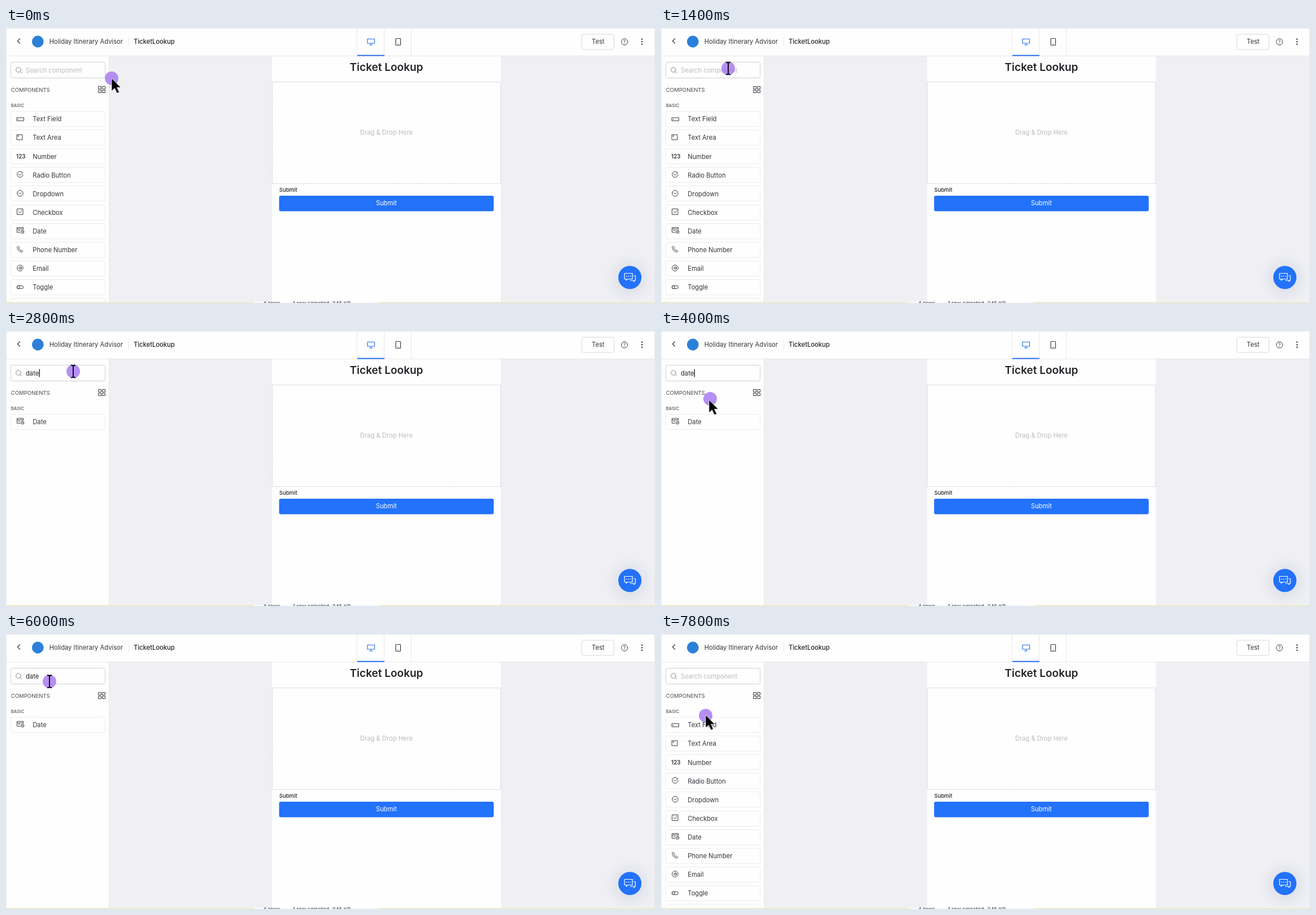
These frames come from a looping animation (1149x487 px, 8 s). An HTML page:

```html
<!DOCTYPE html>
<html lang="en">
<head>
<meta charset="utf-8">
<title>Form builder</title>
<style>
  html, body { margin: 0; width: 100%; height: 100%; overflow: hidden; background: #f0f0f4; }
  svg { display: block; }
  text { font: 400 11.2px Inter, sans-serif; fill: #33353b; white-space: pre; }
  .mid { text-anchor: middle; }
  .medium { font-weight: 500; fill: #24262b; }
  .hint { fill: #bcbcc0; }
  .panel { fill: #fefefe; }
  .rule { stroke: #e8e8ea; fill: none; }
  .icon { fill: none; stroke: #3a3b40; stroke-width: 1; stroke-linecap: round; stroke-linejoin: round; }
  .row rect { fill: #fefefe; stroke: #ececee; }
  .row.hover rect { fill: #f1f1f4; }
  .ink { fill: #000; stroke: #fff; stroke-width: .7; }
</style>
</head>
<body>
<svg width="1149" height="487" viewBox="0 0 1149 487">
  <defs>
    <radialGradient id="glow">
      <stop offset=".4" stop-color="#bfc6da" stop-opacity=".32"/>
      <stop offset="1" stop-color="#d5d9e6" stop-opacity="0"/>
    </radialGradient>
  </defs>
  <rect width="1149" height="487" fill="#f0f0f4"/>

  <!-- form canvas -->
  <rect class="panel" x="471" y="49" width="405" height="437"/>
  <text class="mid" x="673.5" y="76.3" style="font-size:19px;font-weight:600;fill:#222428">Ticket Lookup</text>
  <rect x="471.5" y="95.5" width="404" height="180" fill="none" stroke="#d0d0d2" stroke-dasharray="2 1"/>
  <text class="mid hint" x="673.5" y="188.6">Drag &amp; Drop Here</text>
  <text x="483.7" y="290.4" class="medium" style="font-size:9.6px">Submit</text>
  <rect x="483.5" y="297" width="380" height="27.5" rx="3" fill="#2272fb"/>
  <text class="mid" x="673.5" y="314.3" style="fill:#fff">Submit</text>

  <!-- sidebar -->
  <rect class="panel" y="49" width="182" height="437"/>
  <path class="rule" d="M182.5 49V486"/>
  <rect x="8.5" y="60.5" width="167" height="28" rx="3" fill="#fefefe" stroke="#d0d0d3"/>
  <g class="icon" style="stroke:#8a8b90"><circle cx="22" cy="74" r="4.3"/><path d="M25.2 77.2l2.6 2.6"/></g>
  <text x="8.7" y="113.4" style="font-size:9.6px;fill:#4a4b50">COMPONENTS</text>
  <path class="icon" d="M164 103.500h4.500v4.500h-4.500zM171 103.500h4.500v4.500h-4.500zM164 110h4.500v4.500h-4.500zM171 110h4.500v4.500h-4.500z"/>
  <text x="8.7" y="140.300" style="font-size:7.800px;font-weight:500;fill:#55565b">BASIC</text>
  <g id="list"></g>
  <rect id="mark" x="35" y="67" height="15" fill="#2f86ee"/>
  <text id="query" x="35" y="78.7"></text>
  <rect id="caret" y="67.500" width="1.200" height="14" fill="#000"/>

  <!-- header -->
  <rect class="panel" width="1149" height="49"/>
  <path class="rule" d="M0 49.5H1149M621.500 0V49M669.500 0V49M717.500 0V49M217.500 16V32"/>
  <path class="icon" style="stroke-width:1.300" d="M24.500 19l-4 4 4 4"/>
  <circle cx="56.300" cy="24" r="10.400" fill="#2c80d8"/>
  <text x="76.700" y="27.700">Holiday Itinerary Advisor</text>
  <text class="medium" x="226" y="27.700">TicketLookup</text>
  <rect x="622" y="47.700" width="48" height="2" fill="#2a70ea"/>
  <path class="icon" style="stroke:#2a70ea;stroke-width:1.200" d="M640 19.500h12.500v7.500h-12.500zM646.200 27v3M643.500 30h5.500"/>
  <g class="icon" style="stroke-width:1.200"><rect x="690" y="18.500" width="8.500" height="12" rx="1"/><path d="M694 28.300h.4"/></g>
  <rect x="1019.500" y="11" width="57" height="27" rx="3" fill="#fefefe" stroke="#d8d8da"/>
  <text class="mid" x="1048.300" y="27.900">Test</text>
  <circle class="icon" cx="1095" cy="24.500" r="5.600"/>
  <text class="mid" x="1095" y="27.600" style="font-size:8.500px">?</text>
  <g fill="#33353b"><circle cx="1126" cy="19.700" r="1.200"/><circle cx="1126" cy="24.200" r="1.200"/><circle cx="1126" cy="28.700" r="1.200"/></g>

  <!-- chat button -->
  <circle cx="1104.500" cy="444" r="48" fill="url(#glow)"/>
  <circle cx="1104.500" cy="441.700" r="20.500" fill="#2272fb"/>
  <g class="icon" style="stroke:#fff;stroke-width:1.200">
    <path d="M1095 434.500h14v10h-8.500l-2.500 2.500v-2.500h-3z"/>
    <path d="M1111.500 438.500h2.800v8.500h-2v2.200l-2.200-2.200h-5"/>
    <path stroke-width="1.500" d="M1098.700 439.500h.3M1102 439.500h.3M1105.300 439.500h.3"/>
  </g>

  <!-- window edge -->
  <path class="rule" d="M.5 0V486M1148.500 0V486M0 .5H1149"/>
  <rect y="485" width="1149" height="2" fill="#f8f6df"/>
  <rect y="486" width="1149" height="1" fill="#e8e2ae"/>
  <rect x="439" y="485" width="221" height="2" fill="#fafafa"/>
  <text x="455" y="491.300" style="font-size:9.500px">4 rows</text>
  <text x="508" y="491.300" style="font-size:9.500px">1 row selected, 345 KB</text>

  <!-- pointer -->
  <circle id="halo" r="12" fill="#a87af0" fill-opacity=".84"/>
  <g id="pointer">
    <path class="ink" d="M0 0V22.500L5.300 17.700 9.500 26.500 13.500 24.700 9.500 16.300H16.200Z"/>
    <path fill="none" stroke="#000" stroke-width="1.800" d="M-4-11q4 0 4 2.500q0-2.500 4-2.500M0-9V9M-4 11q4 0 4-2.500q0 2.500 4 2.500"/>
    <path class="ink" d="M0-13l4.500 5h-3.300v6.800h6.800v-3.300l5 4.500-5 4.500v-3.300h-6.800v6.800h3.300l-4.500 5-4.500-5h3.300v-6.800h-6.800v3.300l-5-4.500 5-4.500v3.300h6.800v-6.800h-3.300z"/>
  </g>
</svg>
<script>
const $ = id => document.getElementById(id);
const LOOP = 8000, STEP = 200;

// Icon paths are relative to the icon centre of a row.
const circle = r => `M${-r} 0a${r} ${r} 0 1 0 ${2 * r} 0a${r} ${r} 0 1 0 ${-2 * r} 0`;
const components = [
  ['Text Field', 'M-5.500-1.500h12v5.500h-12zM-3.500 1v1.200'],
  ['Text Area', 'M-5.500-4.500h9.500v9h-9.500zM-3.500-2.500h1.500M-3.500-2.500v1.500'],
  ['Number', ''],
  ['Radio Button', 'M4.500-3a5.200 5.200 0 1 0 .7 3M-2.500-1l2.300 2.300 5-5'],
  ['Dropdown', circle(5.2) + 'M-2.200-1l2.200 2.200 2.200-2.200'],
  ['Checkbox', 'M-5-5.500h10v10h-10zM-2.500-.5l2 2 3.500-4'],
  ['Date', 'M0 3h-5.500v-8.500h11v3M-5.500-3h11M-3.200-.5h3M1.500 2a2.700 2.700 0 1 0 5.400 0a2.700 2.700 0 1 0-5.400 0M4.200 .8v1.500h1'],
  ['Phone Number', 'M-4-5.500l-1.200 1.400c0 5 4.500 9 8.700 9l1.500-1.500-2.800-2.400-1.600 1.100-3-3.200 1-1.500z'],
  ['Email', circle(2) + 'M2-2v3q.2 1.500 1.600 1.300q1.700-.5 1.700-2.500a5.300 5.300 0 1 0-2.300 4.600'],
  ['Toggle', 'M-2.800-2h5.600a2.700 2.700 0 0 1 0 5.400h-5.600a2.700 2.700 0 0 1 0-5.400M-.5 .7a2.600 2.600 0 1 0-5.200 0a2.600 2.600 0 1 0 5.200 0'],
  ['Address', 'M0 2.500c-4-4-3-8 0-8s4 4 0 8M-.3-2.500h.6M-2.500 0h-1.500l-1.700 4.500h11.400l-1.700-4.500h-1.500'],
  ['Range Slider', 'M-5.500-4h10M-5.500 0h10M-5.500 4h10M1.500-5v2M-2.500-1v2M1.500 3v2'],
  ['Password', 'M-5-1h10v5.500h-10zM-3-1v-1.500a3 3 0 0 1 6 0v1.500M-2.500 2h.2M0 2h.2M2.500 2h.2']
];

// [time, shape, x, y, tip dx, tip dy]
const moves = [
  [0, 0, 187, 89], [200, 0, 178, 86], [400, 1, 150, 76], [600, 1, 124, 68],
  [800, 1, 117.500, 78, 0, -1], [1000, 1, 118, 75], [1200, 1, 119, 71.500],
  [3600, 1, 113, 82], [3800, 0, 99, 102], [4000, 0, 87, 120, -2, 2],
  [4200, 0, 80, 129], [4400, 0, 72, 143], [4600, 0, 66, 122],
  [4800, 2, 65.500, 153.500], [5800, 0, 70, 126], [6000, 1, 77, 84], [6200, 1, 79.500, 74],
  [7600, 0, 80, 111], [7800, 0, 79, 144.500, 0, -1]
];
const typed = [[0, ''], [1800, 'd'], [2200, 'da'], [2800, 'date'], [7400, '']];
const filters = [[0, ''], [2000, 'd'], [2400, 'da'], [7400, '']];
const carets = [[0, 0], [800, 1], [1400, 0], [1600, 1], [5200, 0], [6600, 1], [6800, 0]];
const selection = [[0, 0], [6800, 1], [7400, 0]];

const at = (track, t) => track.findLast(key => key[0] <= t);
const set = (el, attrs) => { for (const k in attrs) el.setAttribute(k, attrs[k]); };

function row([name, icon], i) {
  const y = 161 + i * 33.1;
  const glyph = icon
    ? `<path class="icon" transform="translate(25 ${y - .7})" d="${icon}"/>`
    : `<text x="18" y="${y + 4}" style="font-size:9.800px;font-weight:600">123</text>`;
  return `<g class="row"><rect x="8.500" y="${Math.round(y - 14) + .5}" width="167" height="27" rx="3"/>
    ${glyph}<text x="47.300" y="${y + 4.3}">${name}</text></g>`;
}

let shown = null;
function showList(filter) {
  if (filter === shown) return;
  shown = filter;
  $('list').innerHTML = components
    .filter(([name]) => name.toLowerCase().includes(filter))
    .slice(0, 11).map(row).join('');
}

function render(t) {
  const text = at(typed, t)[1], selected = at(selection, t)[1];
  const [, shape, x, y, dx = 0, dy = 0] = at(moves, t);

  showList(at(filters, t)[1]);
  $('list').firstElementChild.classList.toggle('hover', shape === 2);

  const query = $('query');
  query.textContent = text || 'Search component';
  query.style.fill = selected ? '#fff' : text ? '#222428' : '#bcbcc0';
  const width = text ? query.getComputedTextLength() : 0;
  set($('mark'), { width: selected ? width : 0 });
  set($('caret'), { x: 35.400 + width, opacity: at(carets, t)[1] });

  set($('halo'), { cx: x, cy: y });
  set($('pointer'), { transform: `translate(${x + dx} ${y + dy})` });
  [...$('pointer').children].forEach((el, i) => set(el, { visibility: i === shape ? 'visible' : 'hidden' }));
}

let last = -1;
function tick() {
  const t = Math.floor(performance.now() % LOOP / STEP) * STEP;
  if (t !== last) render(last = t);
  requestAnimationFrame(tick);
}
tick();
</script>
</body>
</html>
```
